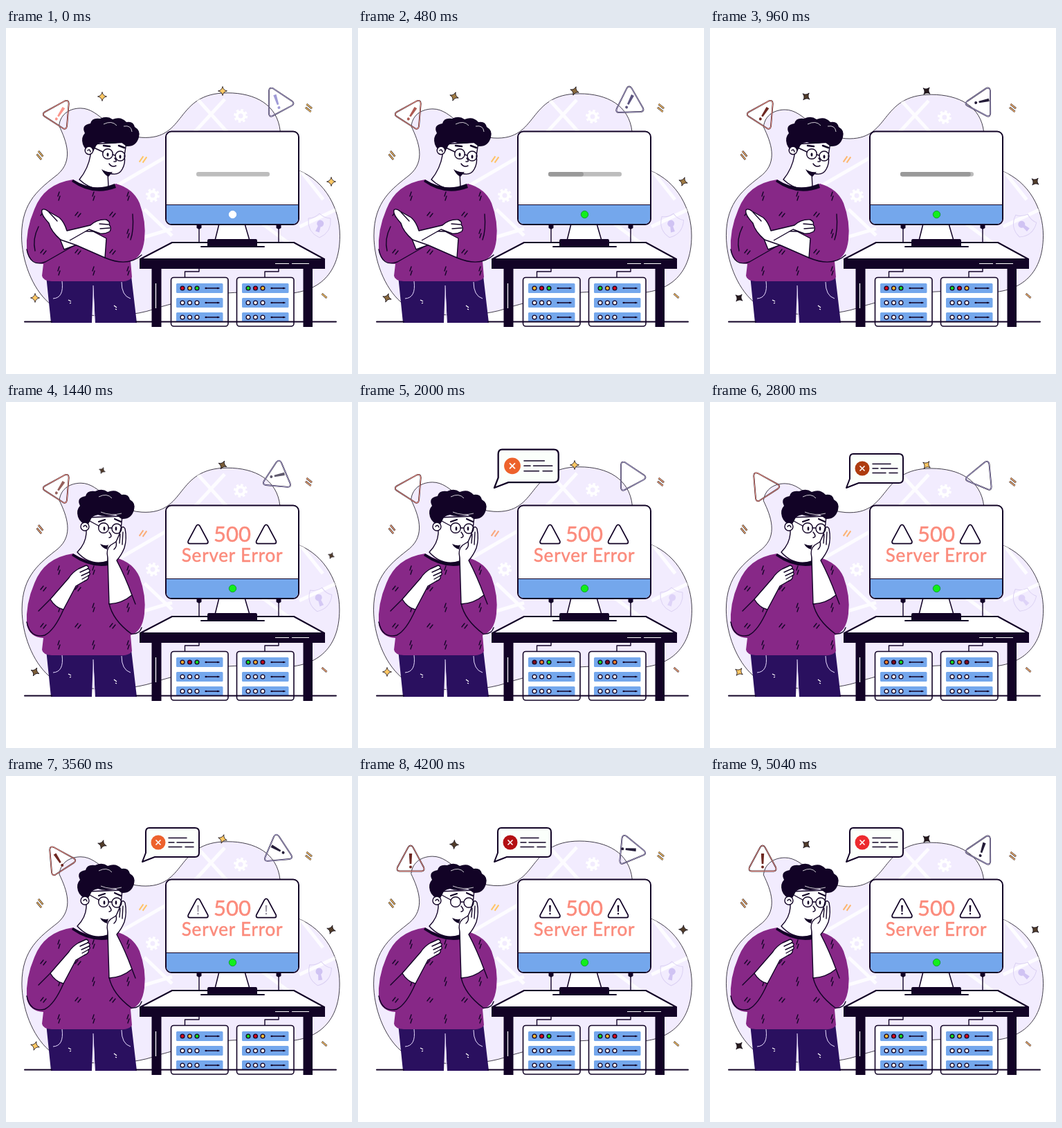
Animation of 500x500 px, one loop 5.08 s. Source, as an HTML page:

```html
<!DOCTYPE html>
<html lang="en">
<head>
<meta charset="utf-8">
<title>Server error</title>
<style>
html, body { margin: 0; width: 100%; height: 100%; overflow: hidden; background: #fff; }
svg { display: block; width: 100vw; height: 100vh; }
text { font-family: Lato, "Open Sans", sans-serif; fill: #fb8b7c; stroke: #fb8b7c; stroke-width: .5; text-anchor: middle; }
.ink { fill: #120326; }
.line { fill: none; stroke: #120326; stroke-width: 1.4; stroke-linecap: round; stroke-linejoin: round; }
.skin { fill: #fff; stroke: #120326; stroke-width: 1.4; stroke-linejoin: round; }
.panel { fill: #fff; stroke: #120326; stroke-width: 2; stroke-linejoin: round; }
.blue { fill: #74a7ec; }
</style>
</head>
<body>
<svg viewBox="0 0 500 500">
  <defs>
    <path id="blob" d="M77 142C79 124 94 117 108 117C137 117 150 156 196 159C262 163 243 95 320 95C360 95 392 112 396 150C400 185 405 197 422 206C462 222 482 262 482 300C482 360 445 383 400 383C300 376 270 390 220 403C180 420 90 420 62 396C38 375 23 335 23 300C23 250 50 232 75 212C98 192 88 165 77 142Z"/>
    <clipPath id="blobClip"><use href="#blob"/></clipPath>
    <path id="tri" d="M-3.500 -18Q0 -23 3.500 -18L19 11Q21 16 16 16.500L-16 16.500Q-21 16 -19 11Z"/>
    <g id="bang"><path d="M-2.200 -10H2.200L1.300 5H-1.300Z"/><circle cy="9.500" r="2"/></g>
    <path id="star" d="M0 -6.500Q1 -1 6.500 0Q1 1 0 6.500Q-1 1 -6.500 0Q-1 -1 0 -6.500Z"/>
    <path id="hair" d="M111 168Q108 158 114 152Q108 140 122 138Q124 129 136 131Q146 126 154 132Q166 127 174 136Q184 134 186 143Q195 148 192 158Q188 172 174 171L166 165Q150 169 140 165Q131 166 129 173L125 180Q114 177 111 168Z"/>
    <path id="knit" d="M97 219Q128 239 159 225Q184 232 193 253Q203 280 200 306Q197 332 180 337L182 360Q178 367 165 366H66Q53 365 52 358L54 341Q34 340 30 322Q28 292 41 262Q55 225 97 219Z"/>
    <pattern id="stitch" x="41" y="225" width="50" height="54" patternUnits="userSpaceOnUse">
      <path class="line" d="M34 18l2 -6m-1 12l2 -6M9 46l4 -5m0 7l4 -5"/>
    </pattern>
  </defs>

  <g id="backdrop">
    <use href="#blob" fill="#f2ecfe" stroke="#15101c" stroke-width=".8"/>
    <g clip-path="url(#blobClip)" fill="none" stroke="#fff" stroke-width="5">
      <path d="M274 101L322 154M316 104L268 156M236 184L150 234M180 308L240 290M200 262L240 300M424 205L458 248M350 268L410 312M424 287L486 258" opacity=".85"/>
      <g id="gears"></g>
    </g>
  </g>
  <g id="deco"></g>

  <path class="ink" style="fill:#2a105f" d="M58 358H181L189 426H129L126 372L124 426H65Z"/>
  <path d="M126 372L128 426M81 366Q84 390 68 391M167 367Q167 387 180 391" fill="none" stroke="#e8ddff"/>
  <path d="M90 393l4 2M92 398l2 -1M156 401l4 3M158 406l2 1" stroke="#fff" stroke-width="1.300"/>
  <use href="#knit" fill="#872887"/>
  <use href="#knit" fill="url(#stitch)"/>

  <g id="calm">
    <path class="line" d="M30 320Q35 346 57 338L99 314M143 332Q176 346 196 328M47 287Q38 305 42 322M183 269Q185 292 180 306"/>
    <path class="skin" d="M78 305L84 320L103 313L136 284Z"/>
    <path class="skin" d="M52 263Q55 260 61 265L77 274Q84 280 88 293L126 294L145 304L143 332L102 314L79 306Q65 294 62 282Q50 269 52 263Z"/>
    <path class="skin" d="M88 293L122 285Q132 276 145 277Q151 280 149 284Q153 289 150 294Q143 298 136 297L120 291L92 307"/>
    <path class="line" d="M135 283L148 284M136 290L150 289M62 266L74 279"/>
    <path class="skin" d="M122 168V184Q119 203 106 219Q126 238 148 230L147 209Q162 215 168 204Q173 195 171 185L174 165Z"/>
    <path class="ink" d="M97 219Q126 238 157 225L159 231Q126 244 95 222ZM138 204Q145 209 154 208L148 215Q142 212 138 204Z"/>
    <use href="#hair" class="ink"/>
    <path d="M141 139Q153 133 160 141M170 142Q181 140 182 150" fill="none" stroke="#fff" stroke-width=".8"/>
    <circle class="skin" cx="120" cy="177" r="5.800"/>
    <path class="line" d="M118 177q3 -3 4 2M127 173L140 179M154 183L158 184M157 188Q162 194 156 193M149 196Q153 202 159 199"/>
    <path class="line" style="stroke-width:2.600" d="M141 170L150 171M163 170L171 173"/>
    <g class="line"><circle cx="147" cy="182" r="7.300"/><circle cx="165" cy="185" r="7"/></g>
    <g class="ink"><ellipse cx="147" cy="183" rx="1.500" ry="2.800"/><ellipse cx="165" cy="186" rx="1.500" ry="2.800"/></g>
  </g>

  <g id="worried">
    <path class="line" d="M30 318Q35 342 56 337Q70 330 83 300M149 291Q154 315 181 335Q193 336 196 326M64 285L47 302M182 279L187 292"/>
    <path class="skin" d="M64 285L91 254Q96 246 105 241L116 236Q121 238 118 241Q123 242 120 246Q123 249 119 251Q121 256 113 259L101 266L83 300Q71 297 64 285Z"/>
    <path class="line" d="M107 246L118 241M109 251L120 246M110 256L119 251"/>
    <path class="skin" d="M116 167V190Q115 205 103 217Q122 238 147 230L148 212Q160 213 164 203L168 165Z"/>
    <path class="ink" d="M97 219Q126 238 149 230V236Q122 241 95 222Z"/>
    <path class="skin" d="M147 225Q144 213 151 207L159 202Q164 193 166 183Q169 178 172 183Q175 198 171 211Q167 221 160 229Q172 252 182 279Q168 291 149 292Z"/>
    <path class="line" d="M159 202Q161 209 156 213M165 191L164 204M169 188L168 206"/>
    <use href="#hair" class="ink" x="-7" y="-2"/>
    <path d="M137 159Q152 165 167 161M134 137Q146 131 153 139" fill="none" stroke="#fff" stroke-width=".8"/>
    <circle class="skin" cx="114" cy="180" r="6"/>
    <path class="line" d="M112 180q3 -4 5 1M121 172L134 179M148 182L153 182M149 188Q155 195 149 196"/>
    <path class="ink" d="M136 205Q145 209 148 206L146 213Q139 211 136 205Z"/>
    <path class="line" style="stroke-width:2.200" d="M134 173L143 170M157 169L166 173"/>
    <g class="line"><circle cx="141" cy="182" r="7.300"/><circle cx="160" cy="183" r="7"/></g>
    <g class="ink" id="pupils"><ellipse cx="142" cy="183" rx="1.400" ry="3"/><ellipse cx="159" cy="183" rx="1.400" ry="3"/></g>
  </g>

  <path class="line" d="M279 287V312M394 287V312M279 346V352H258.500V361M394 346V352H374V361"/>
  <path class="panel" d="M240 310H416L460 334H194Z"/>
  <path class="ink" d="M193 333H461V348H443V432H429.500V348H224.500V432H210.500V348H193Z"/>
  <path d="M389 340.500H409M413 340.500H438M216.500 369V405" stroke="#fff" stroke-width="1.200"/>
  <path class="panel" style="stroke-width:1.500" d="M308 283H345L352 307H302Z"/>
  <path class="ink" d="M293 305H361Q363 305 363 308V316H291V308Q291 305 293 305ZM275.500 284H282.500V289L279 291L275.500 289ZM390.500 284H397.500V289L394 291L390.500 289Z"/>
  <path class="line" style="stroke-width:2" d="M282 316H373"/>
  <rect class="panel" x="231" y="149.500" width="192" height="134.500" rx="8"/>
  <path class="blue" d="M232 255.500H422V276Q421 283 415 283H239Q233 283 232 276Z"/>
  <path d="M232 255.500H422" class="line" style="stroke-width:1"/>
  <circle id="power" cx="327.500" cy="269.500" r="5.200"/>

  <g id="loading">
    <rect x="275" y="208" width="106" height="6.500" rx="3" fill="#bdbdbd"/>
    <rect id="bar" x="275" y="208" height="6.500" rx="3" fill="#999"/>
  </g>
  <g id="failure">
    <text x="327" y="202" font-size="31">500</text>
    <text x="327" y="231" font-size="26" letter-spacing=".8">Server Error</text>
    <g id="alerts"></g>
  </g>
  <g id="racks"></g>
  <path d="M27 424.500H66M188 424.500H477" class="line" style="stroke-width:2"/>
  <g id="bubble">
    <path class="panel" style="fill:#fbfffb" d="M207 75H273Q279 75 279 81V111Q279 117 273 117H215L197 124L202 111V81Q202 75 207 75Z"/>
    <circle id="cross" cx="220" cy="96" r="10.500"/>
    <path d="M216.500 92.500l7 7m0 -7l-7 7" stroke="#fff" stroke-width="1.600"/>
    <path class="line" d="M235 89.500H261M235 96H243M247 96H271M235 102.500H254M259 102.500H271"/>
  </g>
</svg>
<script>
const LOOP = 5080, STEP = 40, FAIL = 1040, SWAY = 2000;
const $ = id => document.getElementById(id);

function set(el, attrs) {
  for (const k in attrs) el.setAttribute(k, attrs[k]);
  return el;
}
function add(parent, tag, attrs = {}) {
  const el = document.createElementNS("http://www.w3.org/2000/svg", tag);
  return parent.appendChild(set(el, attrs));
}
const show = (id, on) => $(id).style.display = on ? "" : "none";
const place = (x, y, r = 0, s = 1) => `translate(${x} ${y}) rotate(${r}) scale(${s})`;
const mix = (a, b, k) => `rgb(${a.map((v, i) => Math.round(v + (b[i] - v) * k))})`;

const clamp = k => Math.max(0, Math.min(1, k));
const part = (t, from, to) => clamp((t - from) / (to - from));
const wave = (t, period) => Math.cos(2 * Math.PI * t / period);
// Eased 0 to 1 between two times
function ramp(t, from, to) {
  const k = part(t, from, to);
  return k * k * (3 - 2 * k);
}
// Ease-out with an overshoot of 13%
function pop(k) {
  const u = k - 1;
  return 1 + 3 * u ** 3 + 2 * u * u;
}

const GOLD = [255, 200, 100], ROSE = [250, 165, 125], DARK = [38, 25, 28];
const RED = [214, 10, 28], MAROON = [130, 12, 28], AMBER = [255, 185, 50], ORANGE = [235, 125, 40];
const GREEN = "#16d61f";

for (const [x, y] of [[339, 128], [212, 242]]) {
  add($("gears"), "circle", { cx: x, cy: y, r: 5.5, "stroke-width": 4 });
  add($("gears"), "circle", { cx: x, cy: y, r: 8.5, "stroke-width": 3, "stroke-dasharray": "3.4 3.28" });
}

function warning(color, ink, pale) {
  const frame = add($("deco"), "g");
  add(frame, "use", { href: "#tri", fill: "none", stroke: "#241a2c", "stroke-width": 1.9 });
  add(frame, "use", { href: "#tri", fill: "none", stroke: color, "stroke-width": 1 });
  const bang = add($("deco"), "use", { href: "#bang" });
  return (x, y, lean, spin, alpha, dark) => {
    set(frame, { transform: place(x, y, lean) });
    set(bang, { transform: place(x, y + 1, spin), opacity: alpha, fill: mix(pale, ink, dark) });
  };
}
const leftSign = warning("#f58d7c", [110, 40, 34], [250, 150, 140]);
const rightSign = warning("#aaa3d6", [36, 28, 56], [160, 155, 215]);

const star = (x, y) => ({ x, y, el: add($("deco"), "use", { href: "#star", stroke: "#17101a", "stroke-width": .8 }) });
const farStars = [star(139, 99), star(470, 222)];
const nearStars = [star(313, 91), star(42, 390)];
const paintStars = (stars, turn, size, dark) => {
  for (const { x, y, el } of stars)
    set(el, { transform: place(x, y, turn, size), opacity: size > .02 ? 1 : 0, fill: mix(GOLD, DARK, dark) });
};

function dash(x, y, r, edge, d = "M-6 -2.300H4M-4 2.300H6") {
  const g = add($("deco"), "g", { transform: place(x, y, r) });
  if (edge) add(g, "path", { d, stroke: "#17101a", "stroke-width": 2.6 });
  return add(g, "path", { d, "stroke-width": edge ? 1.4 : 2 });
}
const dashes = [dash(49, 184, 50, true), dash(198, 190, -55, false), dash(437.5, 115.5, 40, true),
  dash(460, 387, 40, true, "M-4.500 0H4.500")];

const shield = add($("deco"), "g");
add(shield, "path", { d: "M0 -18Q7 -11 16 -11Q18 9 0 17Q-18 9 -16 -11Q-7 -11 0 -18Z", fill: "none", stroke: "#dbd1f3" });
const keyhole = add(shield, "path", { d: "M-2 1A5 5 0 1 1 2 1L3 9H-3Z", fill: "#d0c3f3" });

const alerts = [277.5, 376].map(x => {
  const g = add($("alerts"), "g", { transform: place(x, 192.5, 0, .74) });
  add(g, "use", { href: "#tri", fill: "#fff", stroke: "#120326", "stroke-width": 2.4 });
  return add(g, "use", { href: "#bang", class: "ink", y: 1, transform: "scale(.85)" });
});

function rack(dx) {
  const g = add($("racks"), "g", { transform: place(dx, 0) });
  add(g, "rect", { class: "panel", x: 238.5, y: 360.5, width: 82.5, height: 70.5, rx: 4, style: "stroke-width:1.6" });
  const leds = [];
  for (let y = 376; y < 420; y += 21) {
    add(g, "rect", { class: "blue", x: 246, y: y - 7, width: 67.5, height: 14, rx: 1.5 });
    add(g, "path", { class: "line", d: `M288 ${y}H308` });
    for (const x of [289, 306]) add(g, "circle", { class: "ink", cx: x, cy: y, r: 1.2 });
    for (let i = 0; i < 3; i++)
      leds.push(add(g, "circle", { cx: 255 + 10.5 * i, cy: y, r: 2.9, fill: "#fff", stroke: "#120326", "stroke-width": 1.3 }));
  }
  return colors => colors.forEach((c, i) => leds[i].setAttribute("fill", c));
}
const lightLeft = rack(0), lightRight = rack(95);

function drawBackground(t, hush) {
  const sway = wave(t, SWAY);
  set($("backdrop"), { transform: `translate(253 270) scale(${1 + .002 * sway} ${1 + .007 * sway}) translate(-253 -270)` });

  const wake = ramp(t, 0, 900);
  const tilt = ramp(t, 2100, 2700), upright = ramp(t, 3700, 4150);
  const lean = 33 - 66 * tilt + 33 * upright;
  leftSign(78 - 2 * tilt, 122.5 - 2.5 * tilt + upright, lean, lean, 1 - hush, wake);
  const spin = 30 - 48 * wave(Math.min(t, FAIL), SWAY) - 138 * ramp(t, 1900, 3400)
    + 155 * ramp(t, 3560, 4200) - 77 * ramp(t, 4200, 5000);
  rightSign(392.5 - sway, 105, -28 * sway, spin, 1 - hush, wake);

  const turn = 20 - 20 * sway;
  paintStars(farStars, turn, 1 - hush, .8 * wake);
  paintStars(nearStars, turn, 1 - ramp(t, 3900, 4200) + ramp(t, 4200, 4600),
    wake - ramp(t, 1100, 1900) + ramp(t, 3700, 5000));

  const tint = mix(GOLD, ROSE, .5 - .45 * wave(t, 2 * SWAY));
  for (const d of dashes) d.setAttribute("stroke", tint);
  set(shield, { transform: place(453, 286, 10 - 10 * sway) });
  set(keyhole, { transform: `rotate(${-25 + 45 * sway})`, opacity: 1 - .4 * hush });
}

function drawScreen(t) {
  const on = t >= 120;
  set($("power"), { fill: on ? "#12ef1c" : "#fff", stroke: on ? "#159a35" : "#fff" });
  $("bar").setAttribute("width", 106 * part(t, 0, 1000));
  $("failure").setAttribute("opacity", part(t, FAIL - STEP, FAIL + 200));
  for (const a of alerts) a.setAttribute("opacity", ramp(t, 3200, 4000));
}

function drawLights(t, hush) {
  const pair = [mix(RED, MAROON, hush), mix(AMBER, ORANGE, hush)];
  if ((t + 1080) % 1200 < 600) pair.reverse();
  lightLeft([...pair, GREEN]);
  lightRight([GREEN, ...pair]);
}

function drawBubble(t) {
  const size = pop(part(t, 1720, 2240));
  show("bubble", size > 0);
  set($("bubble"), { transform: `translate(197 124) scale(${size}) translate(-197 -124)` });
  const hue = 17 - 18 * ramp(t, 3600, 4150), light = 46 - 9 * wave(t - 2800, 1520);
  $("cross").setAttribute("fill", `hsl(${hue} 84% ${light}%)`);
}

function draw(t) {
  const failed = t >= FAIL;
  const hush = ramp(t, 1200, 1900) - ramp(t, 3000, 3400);
  show("calm", !failed);
  show("loading", !failed);
  show("worried", failed);
  show("failure", failed);
  show("pupils", Math.abs(t - 4200) > 70);
  drawBackground(t, hush);
  drawScreen(t);
  drawLights(t, hush);
  drawBubble(t);
}

const start = performance.now();
function tick() {
  const t = (performance.now() - start) % LOOP;
  draw(Math.floor(t / STEP) * STEP);
  requestAnimationFrame(tick);
}
tick();
</script>
</body>
</html>
```
